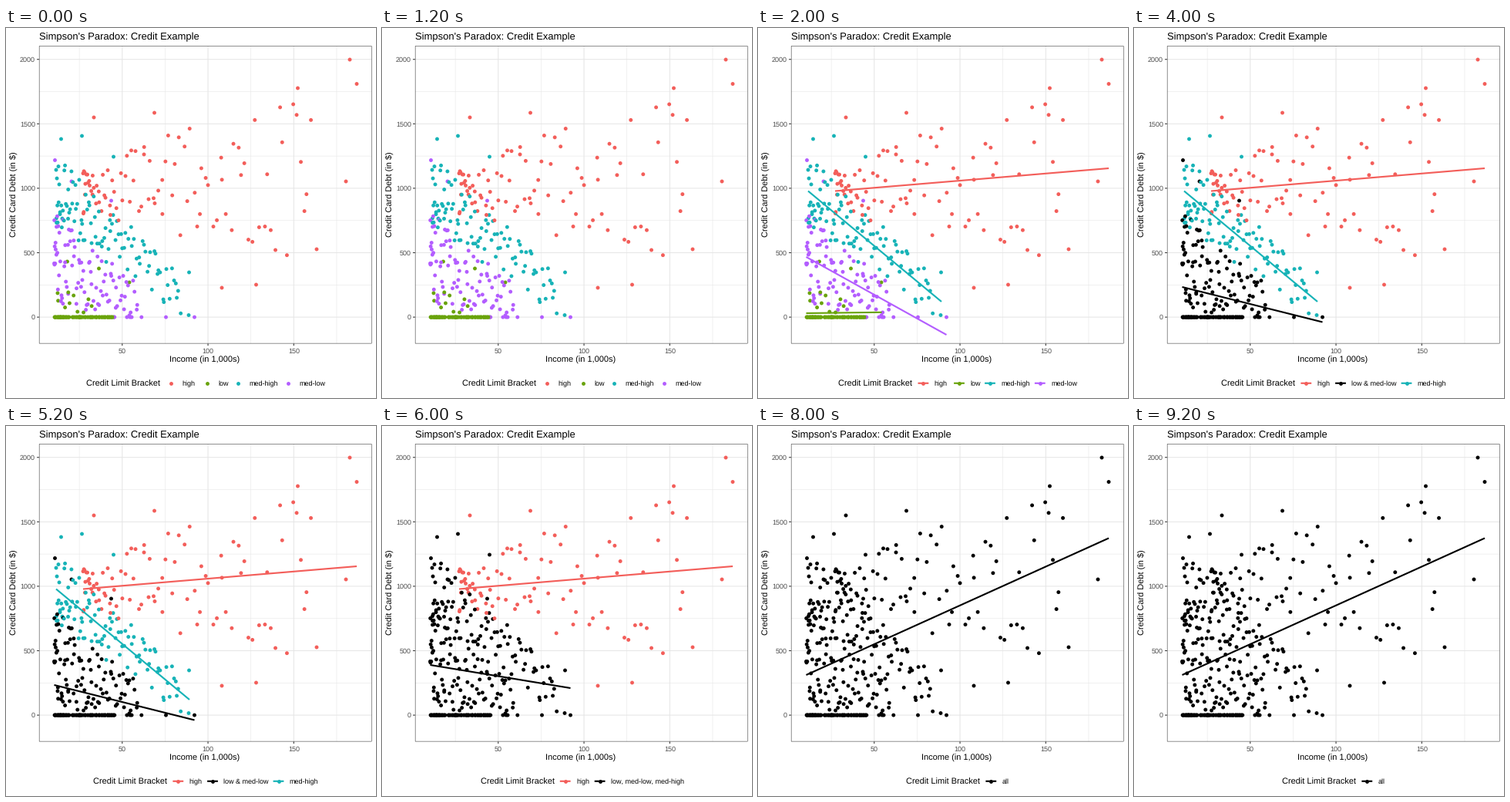
Animation, 480 px wide and 480 px high, one loop 10 s. Source, as a matplotlib script:

```python
import numpy as np
import matplotlib.pyplot as plt
from matplotlib.animation import FuncAnimation
from matplotlib.patches import Rectangle

plt.rcParams.update({"font.family": "Liberation Sans", "text.hinting": "none",
                     "text.hinting_factor": 1})

SIZE, DPI = 480, 72          # at 72 dpi one point is one pixel
LEFT, TOP, RIGHT, BOTTOM = 42.9, 23.2, 474.5, 409.4
RED, GREEN, TEAL, PURPLE, BLACK = "#F35E5A", "#69A30B", "#17B3B7", "#B35DFF", "#000000"
GRID, DARK, GREY = "#E6E6E6", "#333333", "#4D4D4D"
DOT = 4.9 ** 2
ZERO = 375.1                 # height of the zero-debt row
KEY_Y = 460.8

rng = np.random.default_rng(7)


def px(income):
    return 150.76 + (income - 50) * 2.2258


def py(debt):
    return ZERO - debt * 0.1672


# Trend lines: x0, y0, x1, y1
HIGH_FIT = (100, 211.5, 455, 182)
LOW_FIT = (62.5, 370, 160.5, 368.8)
MED_HIGH_FIT = (65, 211.5, 238, 355)
MED_LOW_FIT = (62.5, 297, 244.5, 398)
LOWER_FIT = (62.5, 336, 244.5, 381.5)
REST_FIT = (62.5, 310, 244.5, 340)
ALL_FIT = (62.5, 323, 455, 145.5)


def spread(n, power=1.0):
    """Stratified random values in 0..1, denser near 0 when power > 1."""
    return ((rng.permutation(n) + rng.random(n)) / n) ** power


def cloud(n, fit, x1, power, h0, h1):
    """Points around a trend line, within +-h0 at its start and +-h1 at x1."""
    fx0, fy0, fx1, fy1 = fit
    t = spread(n, power)
    x = fx0 + (x1 - fx0) * t
    y = fy0 + (fy1 - fy0) * (x - fx0) / (fx1 - fx0)
    y += (h0 + (h1 - h0) * t) * (2 * spread(n) - 1)
    return np.column_stack([x, np.minimum(y, ZERO)])


def row(n, x0, x1, power=1.0):
    """Points with no debt."""
    return np.column_stack([x0 + (x1 - x0) * rng.random(n) ** power, np.full(n, ZERO)])


# The outermost points are placed, the rest is seeded.
groups = [
    np.vstack([[(446, 41), (455, 72.5), (378.5, 78), (192.5, 110), (114, 116),
                (441, 199), (403, 287), (280, 337), (324.5, 333)],
               cloud(92, HIGH_FIT, 400, 1.7, 32, 118)]),
    np.vstack([[(160, 330), (79.5, 303), (120.5, 312)],
               np.column_stack([62 + 50 * spread(10), 340 + 32 * spread(10)]),
               row(78, 62, 140, 1.25)]),
    np.vstack([[(71.5, 144), (98.5, 140), (139.5, 167), (237.5, 317), (237, 372.5)],
               cloud(100, MED_HIGH_FIT, 228, 1.5, 46, 26)]),
    np.vstack([[(63.5, 171.5), (85, 199), (136.5, 224), (244.5, ZERO), (207.5, ZERO)],
               cloud(90, MED_LOW_FIT, 172, 1.5, 60, 24),
               row(5, 138, 176)]),
]
points = np.vstack(groups)
group = np.repeat(np.arange(4), [len(g) for g in groups])
order = rng.permutation(len(points))
points, group = points[order], group[order]

# Group colours, legend title x, then (key x, label, colour, trend line)
STAGES = [
    ((RED, GREEN, TEAL, PURPLE), 104,
     [(214.4, "high", RED, None), (261, "low", GREEN, None),
      (301, "med-high", TEAL, None), (365.8, "med-low", PURPLE, None)]),
    ((RED, GREEN, TEAL, PURPLE), 104,
     [(214.4, "high", RED, HIGH_FIT), (261, "low", GREEN, LOW_FIT),
      (301, "med-high", TEAL, MED_HIGH_FIT), (365.8, "med-low", PURPLE, MED_LOW_FIT)]),
    ((RED, BLACK, TEAL, BLACK), 113,
     [(223.3, "high", RED, HIGH_FIT), (268, "low & med-low", BLACK, LOWER_FIT),
      (353.5, "med-high", TEAL, MED_HIGH_FIT)]),
    ((RED, BLACK, BLACK, BLACK), 127.5,
     [(237.7, "high", RED, HIGH_FIT), (282.6, "low, med-low, med-high", BLACK, REST_FIT)]),
    ((BLACK,) * 4, 192, [(302.3, "all", BLACK, ALL_FIT)]),
]

fig = plt.figure(figsize=(SIZE / DPI, SIZE / DPI), dpi=DPI, facecolor="white")
ax = fig.add_axes([0, 0, 1, 1])
ax.set(xlim=(0, SIZE), ylim=(SIZE, 0))
ax.axis("off")


def line(x0, y0, x1, y1, color, width, z=1):
    return ax.plot([x0, x1], [y0, y1], color=color, lw=width, zorder=z,
                   solid_capstyle="butt", snap=False)[0]


def dots(xy, colors):
    return ax.scatter(*np.transpose(xy), s=DOT, c=colors, lw=0, zorder=3)


def label(x, y, s, size, color="black", ha="left", **kw):
    return ax.text(x, y, s, size=size, color=color, ha=ha, **kw)


def draw_panel():
    for v in range(25, 176, 50):
        line(px(v), TOP, px(v), BOTTOM, GRID, 0.53)
    for v in range(250, 1751, 500):
        line(LEFT, py(v), RIGHT, py(v), GRID, 0.53)
    for v in (50, 100, 150):
        line(px(v), TOP, px(v), BOTTOM, GRID, 1.07)
        line(px(v), BOTTOM, px(v), BOTTOM + 2.75, DARK, 1.07)
        label(px(v), 422.3, str(v), 8.8, GREY, ha="center")
    for v in range(0, 2001, 500):
        line(LEFT, py(v), RIGHT, py(v), GRID, 1.07)
        line(LEFT - 2.75, py(v), LEFT, py(v), DARK, 1.07)
        label(38, py(v) + 3.2, str(v), 8.8, GREY, ha="right")
    ax.add_patch(Rectangle((LEFT + 0.27, TOP + 0.27), RIGHT - LEFT - 0.54,
                           BOTTOM - TOP - 0.54, fill=False, ec=DARK, lw=0.54,
                           zorder=5, snap=False))
    label(43, 15, "Simpson's Paradox: Credit Example", 13.2)
    label(257.5, 434, "Income (in 1,000s)", 11, ha="center")
    label(13.2, 216, "Credit Card Debt (in $)", 11, ha="center", va="baseline",
          rotation=90, rotation_mode="anchor")


def build(colors, title_x, keys):
    """Create every artist of one stage."""
    made = [dots(points, [colors[g] for g in group]),
            label(title_x, 465, "Credit Limit Bracket", 11)]
    for x, name, color, fit in keys:
        made += [dots([(x, KEY_Y)], [color]), label(x + 14.2, 464, name, 8.8)]
        if fit:
            made += [line(*fit, color, 2.13, 4),
                     line(x - 6.9, KEY_Y, x + 6.9, KEY_Y, color, 2.13, 4)]
    return made


draw_panel()
stages = [build(*s) for s in STAGES]


def show(i):
    for k, artists in enumerate(stages):
        for a in artists:
            a.set_visible(k == i)
    return []


anim = FuncAnimation(fig, show, frames=len(STAGES), interval=2000,
                     repeat=True, repeat_delay=0, blit=False)
plt.show()
```
